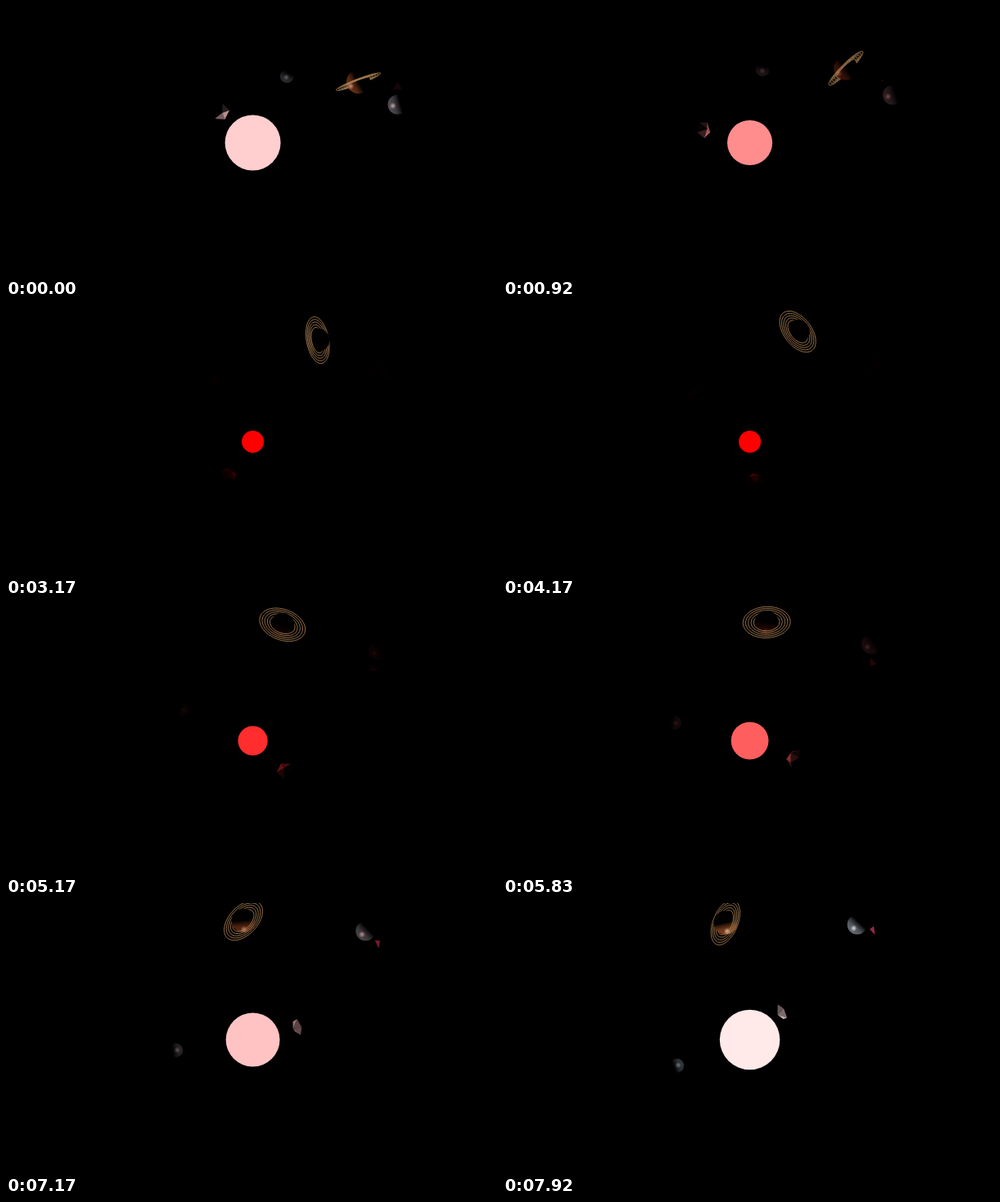
These frames come from a looping animation (600 px wide and 332 px high, 8000 ms). An HTML page with a canvas:

```html
<!DOCTYPE html>
<html lang="en">
<head>
<meta charset="utf-8">
<title>Pulsing star</title>
<style>
html, body { margin: 0; width: 100%; height: 100%; overflow: hidden; background: #000; }
canvas { display: block; }
</style>
</head>
<body>
<canvas id="stage" width="600" height="332"></canvas>
<script>
const ctx = document.getElementById('stage').getContext('2d');
const LOOP = 8000, STEP = LOOP / 96, TAU = Math.PI * 2;
const SUN = { x: 301.6, y: 167.5 };
const { sin, cos, hypot, max, min, floor } = Math;

const at = (x, y, from = SUN) => ({ x: from.x + x, y: from.y + y });
const clamp = v => max(0, min(1, v));

// All triples of vertices that lie one edge apart
function solid(verts, edge) {
  const near = (a, b) => Math.abs(hypot(a[0] - b[0], a[1] - b[1], a[2] - b[2]) - edge) < 0.01;
  const faces = [];
  for (let i = 0; i < verts.length; i++)
    for (let j = i + 1; j < verts.length; j++)
      for (let k = j + 1; k < verts.length; k++)
        if (near(verts[i], verts[j]) && near(verts[j], verts[k]) && near(verts[i], verts[k]))
          faces.push([verts[i], verts[j], verts[k]]);
  return { faces, size: hypot(...verts[0]) };
}

const GOLD = (1 + Math.sqrt(5)) / 2;
const icoVerts = [];
for (const a of [-1, 1])
  for (const b of [-GOLD, GOLD]) icoVerts.push([0, a, b], [a, b, 0], [b, 0, a]);
const ICO = solid(icoVerts, 2);
const TETRA = solid([[1, 1, 1], [1, -1, -1], [-1, 1, -1], [-1, -1, 1]], Math.sqrt(8));

function toSun(p) {
  const dx = SUN.x - p.x, dy = SUN.y - p.y, d = hypot(dx, dy);
  return { x: dx / d, y: dy / d };
}

function tint(rgb, light, k) {
  const f = k * light.power;
  return `rgb(${rgb.map((v, i) => Math.round(min(255, v * f * (i ? light.pale : 1))))})`;
}

function spin([x, y, z], ax, ay) {
  const x1 = x * cos(ay) + z * sin(ay), z1 = z * cos(ay) - x * sin(ay);
  return [x1, y * cos(ax) - z1 * sin(ax), y * sin(ax) + z1 * cos(ax)];
}

function drawSolid(shape, p, r, rgb, light, ax, ay, gamma) {
  const l = toSun(p), s = r / shape.size;
  for (const face of shape.faces) {
    const pts = face.map(v => spin(v, ax, ay));
    const n = [0, 1, 2].map(i => pts[0][i] + pts[1][i] + pts[2][i]);
    if (n[2] <= 0) continue;
    const lit = (n[0] * l.x + n[1] * l.y + n[2] * 0.15) / hypot(...n);
    if (lit <= 0) continue;
    ctx.fillStyle = tint(rgb, light, min(1, lit) ** gamma);
    ctx.beginPath();
    for (const v of pts) ctx.lineTo(p.x + v[0] * s, p.y + v[1] * s);
    ctx.fill();
  }
}

// A sphere lit from the star's side; edge is where the shadow begins along its width
function drawSphere(p, r, rgb, light, edge, shine, shineAt, shineSize) {
  const l = toSun(p);
  const g = ctx.createLinearGradient(p.x + l.x * r, p.y + l.y * r, p.x - l.x * r, p.y - l.y * r);
  g.addColorStop(0, tint(rgb, light, 0.85));
  g.addColorStop(edge * 0.5, tint(rgb, light, 0.65));
  g.addColorStop(edge * 0.8, tint(rgb, light, 0.3));
  g.addColorStop(edge, '#000');
  ctx.fillStyle = g;
  ctx.beginPath();
  ctx.arc(p.x, p.y, r, 0, TAU);
  ctx.fill();

  const hx = p.x + l.x * r * shineAt, hy = p.y + l.y * r * shineAt;
  const h = ctx.createRadialGradient(hx, hy, 0, hx, hy, r * shineSize);
  const c = Math.round(255 * light.pale);
  h.addColorStop(0, `rgba(255,${c},${c},${shine * light.power})`);
  h.addColorStop(1, `rgba(255,${c},${c},0)`);
  ctx.fillStyle = h;
  ctx.fill();
}

function drawRings(p, t, start) {
  const phase = 0.365 + 0.482 * t;
  const turn = Math.atan2(-0.1 - 0.82 * cos(phase), -0.92 * sin(phase)) + Math.PI / 2;
  const flat = 0.38 - 0.28 * cos(phase);
  ctx.strokeStyle = '#ac8052';
  ctx.lineWidth = 0.85;
  for (let i = 0; i < 5; i++) {
    const a = 16 + i * 3.25;
    ctx.beginPath();
    ctx.ellipse(p.x, p.y, a, a * flat, turn, start, start + Math.PI);
    ctx.stroke();
  }
}

function draw(t) {
  const pulse = -cos(0.63 * (t - 3.67));
  const pale = clamp((120 + 127 * pulse) / 255);
  const power = clamp(0.58 + 0.45 * pulse);
  const lightAt = falloff => ({ pale, power: power ** falloff });
  const far = lightAt(1.9);

  ctx.fillStyle = '#000';
  ctx.fillRect(0, 0, 600, 332);

  // ringed planet
  const q = 1.035 - 0.148 * t - 0.001 * t * t;
  const ringed = at(150 * sin(q), -146.5 * cos(q));
  drawRings(ringed, t, 0);
  drawSphere(ringed, 14.5, [165, 95, 42], far, 0.5, 0.8, 0.76, 0.3);
  drawRings(ringed, t, Math.PI);

  // outer planet and its moon
  const o = 0.258 + 0.0712 * t, d = 183 + 1.2 * t;
  const outer = at(d * cos(o), -d * sin(o));
  drawSphere(outer, 12, [122, 146, 156], far, 0.66, 0.9, 0.5, 0.34);
  const m = 0.56 * t;
  const moon = at(-22 * sin(m), -22 * cos(m), outer);
  drawSolid(TETRA, moon, 7, [180, 52, 92], far, 0.5 + 0.5 * t, 0.9 + 0.4 * t, 0.8);

  // middle planet
  const b = -0.455 + 0.319 * t - 0.0023 * t * t;
  const middle = at(-95 * sin(b), -91 * cos(b));
  drawSphere(middle, 8.5, [58, 76, 82], lightAt(1.3), 0.75, 0.4, 0.2, 0.45);

  // faceted inner rock
  const a = -2.45 + 0.61 * t;
  const rock = at(63 * sin(a), 50 * cos(a));
  drawSolid(ICO, rock, 12, [250, 240, 240], lightAt(0.7), 0.4 + 0.5 * t, 0.3 + 0.6 * t, 1.7);

  const gb = Math.round(pale * 255);
  ctx.fillStyle = `rgb(255,${gb},${gb})`;
  ctx.beginPath();
  ctx.arc(SUN.x, SUN.y, 25.5 + 12.6 * pulse, 0, TAU);
  ctx.fill();
}

const begin = performance.now();
function frame() {
  const ms = max(0, performance.now() - begin) % LOOP;
  // The picture moves in 96 equal steps per loop
  draw(floor((ms + 3.4) / STEP) % 96 * STEP / 1000);
  requestAnimationFrame(frame);
}
frame();
</script>
</body>
</html>
```
